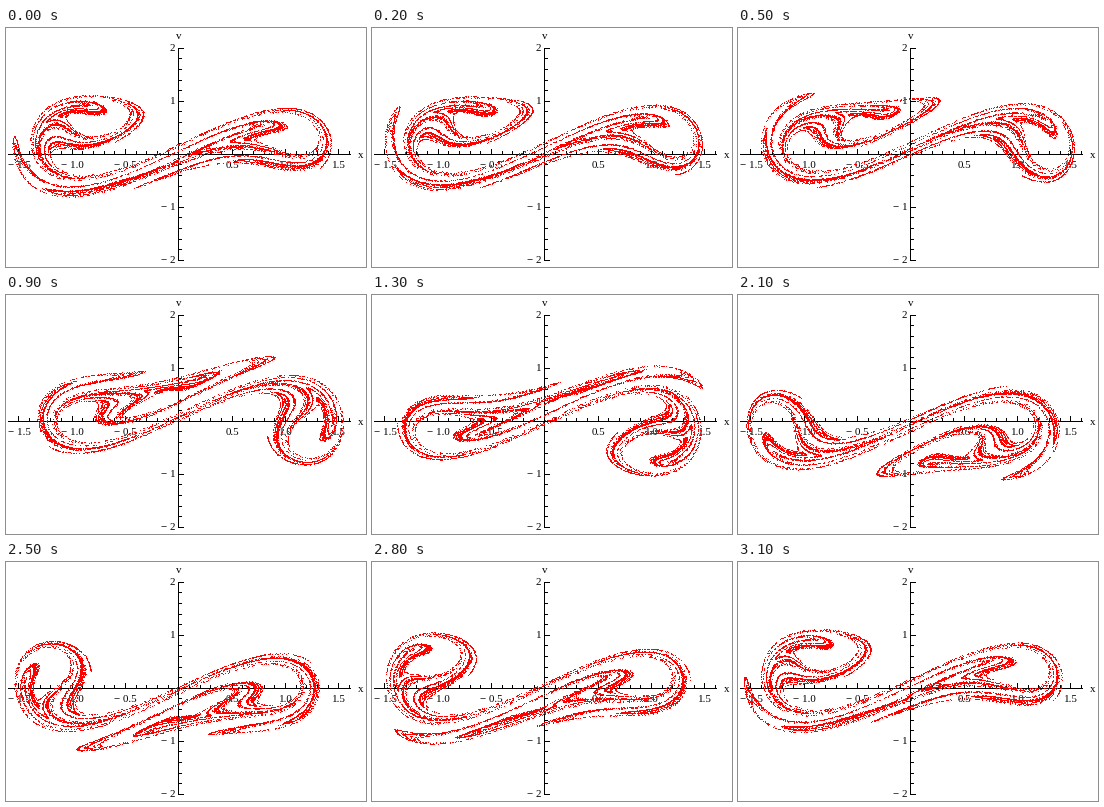
These frames come from a looping animation (360 by 239 pixels, 3200 ms). A matplotlib script:

```python
import numpy as np
import matplotlib.pyplot as plt
from matplotlib.animation import FuncAnimation

# Stroboscopic section of x'' + DELTA x' - x + x^3 = GAMMA cos(OMEGA t)
DELTA, GAMMA, OMEGA = 0.1, 0.35, 1.4
FRAMES, PHASE_STEP = 32, 0.2
POINTS, PERIODS = 12000, 50

W, H, DPI = 360, 239, 64
PX = 72 / DPI
X0, Y0, SX, SY = 172.3, 125.8, 106.6, 53.0


def slope(phase, s):
    x, v = s
    return np.array([v, x - x * x * x - DELTA * v + GAMMA * np.cos(phase)])


def advance(s, phase, span, steps):
    """Carry all states through a span of drive phase with RK4."""
    dp = span / steps
    h = dp / OMEGA
    for i in range(steps):
        p = phase + i * dp
        a = slope(p, s)
        b = slope(p + dp / 2, s + h / 2 * a)
        c = slope(p + dp / 2, s + h / 2 * b)
        d = slope(p + dp, s + h * c)
        s = s + h / 6 * (a + 2 * b + 2 * c + d)
    return s


rng = np.random.default_rng(4)
state = rng.uniform(-0.05, 0.05, (2, POINTS))
for _ in range(PERIODS):
    state = advance(state, 0, 2 * np.pi, 64)

sections = [state]
for k in range(FRAMES - 1):
    sections.append(advance(sections[-1], k * PHASE_STEP, PHASE_STEP, 4))

fig = plt.figure(figsize=(W / DPI, H / DPI), dpi=DPI, facecolor="white")
ax = fig.add_axes([0, 0, 1, 1])
ax.set(xlim=(0, W), ylim=(H, 0))
ax.axis("off")


def line(xs, ys):
    ax.plot(xs, ys, color="black", lw=PX, antialiased=False,
            solid_capstyle="butt", zorder=1)


def label(x, y, text, ha="center"):
    ax.text(x, y, text.replace("-", "\u2212 "), ha=ha, va="baseline",
            family="Liberation Serif", fontsize=11 * PX, zorder=1)


line([2, 344], [Y0, Y0])
line([X0, X0], [20, 232])
for i in range(-15, 17):
    x = X0 + i / 10 * SX
    major = i % 5 == 0
    line([x, x], [Y0, Y0 - (5 if major else 3)])
    if major and i:
        label(x + 0.8, 140, f"{i / 10:.1f}")
for i in range(-10, 11):
    y = Y0 - i / 5 * SY
    major = i % 5 == 0
    line([X0, X0 + (5 if major else 3)], [y, y])
    if major and i:
        label(169.5, y + 3.5, str(i // 5), "right")
label(355, 130, "x")
label(173, 11, "v")

dots, = ax.plot([], [], ",", color="#ff0000", zorder=2)


def draw(k):
    x, v = sections[k]
    dots.set_data(X0 + SX * x, Y0 - SY * v)
    return dots,


anim = FuncAnimation(fig, draw, frames=FRAMES, init_func=lambda: draw(0),
                     interval=100, repeat=True, repeat_delay=0, blit=False)
plt.show()
```
